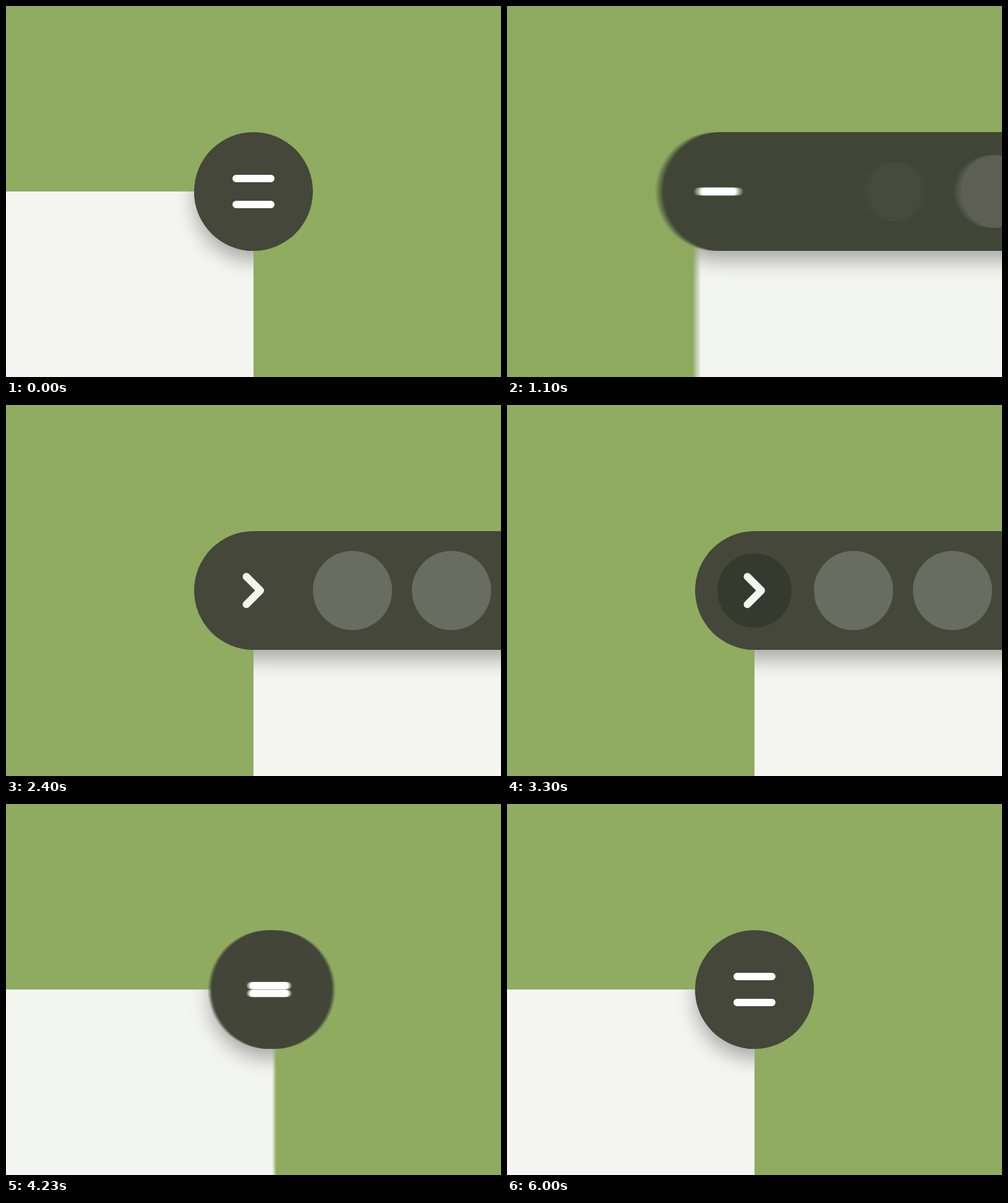
Recreate the animation shown at these times as an HTML page with a canvas. Size 800 by 600 pixels, loop 6.03 s.

```html
<!DOCTYPE html>
<html lang="en">
<head>
<meta charset="utf-8">
<title>Menu bar</title>
<style>
  html, body { margin: 0; width: 100%; height: 100%; overflow: hidden; background: #8fac61; }
  canvas { display: block; width: 800px; height: 600px; }
</style>
</head>
<body>
<canvas id="stage" width="800" height="600"></canvas>
<script>
const LOOP = 6030, HALF = LOOP / 2, FIRST_CLICK = 185;
const WIDTH = 800, RADIUS = 96, MID = 300;
const MOVE = 1066, CAP_DELAY = 95, PAN_DELAY = 205, SHUTTER = 15.7;
const GREEN = '#8fac61', PAPER = '#f4f5f0', DARK = '#444739';

const stage = document.getElementById('stage').getContext('2d');

// The whole scene in panel coordinates; the stage shows a shifted window of it.
const PAD = 440;
const sheet = document.createElement('canvas');
sheet.width = WIDTH + 2 * PAD;
sheet.height = 600;
const g = sheet.getContext('2d');

const clamp = v => Math.max(0, Math.min(1, v));
const smooth = u => u * u * (3 - 2 * u);

// cubic-bezier(.75, 0, .25, 1)
function ease(u) {
  if (u <= 0) return 0;
  if (u >= 1) return 1;
  let lo = 0, hi = 1;
  for (let i = 0; i < 26; i++) {
    const s = (lo + hi) / 2, r = 1 - s;
    const x = 2.25 * s * r * r + 0.75 * s * s * r + s * s * s;
    if (x < u) lo = s; else hi = s;
  }
  return smooth((lo + hi) / 2);
}

const progress = (p, delay) => ease((p - delay) / MOVE);

function panelLeft(p, opening) {
  const d = WIDTH * progress(p, PAN_DELAY);
  return opening ? d - 400 : 400 - d;
}

// Upper stroke of the icon: x1, y1, x2, y2, brightness (the lower one is mirrored)
const MENU = [-28, -21, 28, -21, 255];
const WIDE = [-28, -24, 28, -24, 255];
const FLAT = [-28, 0, 28, 0, 255];
const NEEDLE = [-36, -4, 36, 0, 250];
const ARROW = [-11.5, -22.5, 11, 0, 244];
const OPEN_KEYS = [[150, MENU], [1000, FLAT], [1700, ARROW]];
const CLOSE_KEYS = [[150, ARROW], [700, NEEDLE], [820, FLAT], [1450, WIDE], [2300, MENU]];

function pose(keys, p) {
  if (p <= keys[0][0]) return keys[0][1];
  for (let i = 1; i < keys.length; i++) {
    const [t0, a] = keys[i - 1], [t1, b] = keys[i];
    if (p < t1) {
      const u = smooth((p - t0) / (t1 - t0));
      return a.map((v, k) => v + (b[k] - v) * u);
    }
  }
  return keys[keys.length - 1][1];
}

function disc(x, r, fill) {
  g.fillStyle = fill;
  g.beginPath();
  g.arc(x, MID, r, 0, 7);
  g.fill();
}

function barPath(cap) {
  g.beginPath();
  g.arc(cap, MID, RADIUS, Math.PI / 2, Math.PI * 1.5);
  g.arc(WIDTH, MID, RADIUS, -Math.PI / 2, Math.PI / 2);
  g.closePath();
}

function panel(cap) {
  g.save();
  g.beginPath();
  g.roundRect(0, MID, WIDTH, 600, RADIUS);
  g.fillStyle = PAPER;
  g.fill();
  g.clip();
  g.shadowColor = 'rgba(0,0,0,.3)';
  g.shadowBlur = 30;
  g.shadowOffsetY = 16;
  barPath(cap);
  g.fillStyle = DARK;
  g.fill();
  g.restore();
}

function items(cap, p, opening) {
  g.save();
  barPath(cap);
  g.clip();
  for (let i = 1; i <= 4; i++) {
    const q = opening
      ? clamp((p - 1090 + 100 * i) / 170)
      : 1 - clamp((p - 40 - 80 * i) / 170);
    if (q > 0) disc(160 * i, 64 * (0.7 + 0.3 * q), `rgba(255,255,255,${0.2 * q})`);
  }
  g.restore();
}

function ripple(x, p) {
  const alpha = 0.2 * clamp(p / 50) * clamp((967 - p) / 667);
  if (alpha <= 0) return;
  const q = p - 100;
  const outer = q < 0 ? 0.6 * p : 60 + 0.08 * q + 0.000107 * q * q;
  const inner = Math.max(0, 0.23 * (p - 300));
  g.beginPath();
  g.arc(x, MID, outer, 0, 7);
  g.closePath();
  if (inner > 0) {
    g.moveTo(x + inner, MID);
    g.arc(x, MID, inner, 0, 7);
  }
  g.fillStyle = `rgba(0,0,0,${alpha})`;
  g.fill('evenodd');
}

function icon(x, [x1, y1, x2, y2, light]) {
  g.lineWidth = 12;
  g.lineCap = g.lineJoin = 'round';
  g.strokeStyle = `rgb(${light},${light},${light - (255 - light) * 0.4})`;
  g.beginPath();
  for (const side of [1, -1]) {
    g.moveTo(x + x1, MID + y1 * side);
    g.lineTo(x + x2, MID + y2 * side);
  }
  g.stroke();
}

function drawSheet(p, opening) {
  const e = progress(p, CAP_DELAY);
  const cap = WIDTH * (opening ? 1 - e : e);
  g.setTransform(1, 0, 0, 1, 0, 0);
  g.fillStyle = GREEN;
  g.fillRect(0, 0, sheet.width, sheet.height);
  g.translate(PAD, 0);
  panel(cap);
  barPath(cap);
  g.fillStyle = DARK;
  g.fill();
  items(cap, p, opening);
  ripple(opening ? WIDTH : 0, p);
  icon(cap, pose(opening ? OPEN_KEYS : CLOSE_KEYS, p));
}

function draw(t) {
  const phase = (t - FIRST_CLICK + LOOP) % LOOP;
  const opening = phase < HALF;
  const p = phase % HALF;
  drawSheet(p, opening);

  // Motion blur of the pan: average several shifted copies.
  const from = panelLeft(p - SHUTTER / 2, opening);
  const to = panelLeft(p + SHUTTER / 2, opening);
  const n = Math.min(20, 1 + Math.ceil(Math.abs(to - from) / 2));
  for (let k = 0; k < n; k++) {
    const left = n === 1 ? panelLeft(p, opening) : from + (to - from) * k / (n - 1);
    stage.globalAlpha = 1 / (k + 1);
    stage.drawImage(sheet, left - PAD, 0);
  }
}

const start = performance.now();
function tick() {
  draw((performance.now() - start) % LOOP);
  requestAnimationFrame(tick);
}
tick();
</script>
</body>
</html>
```
